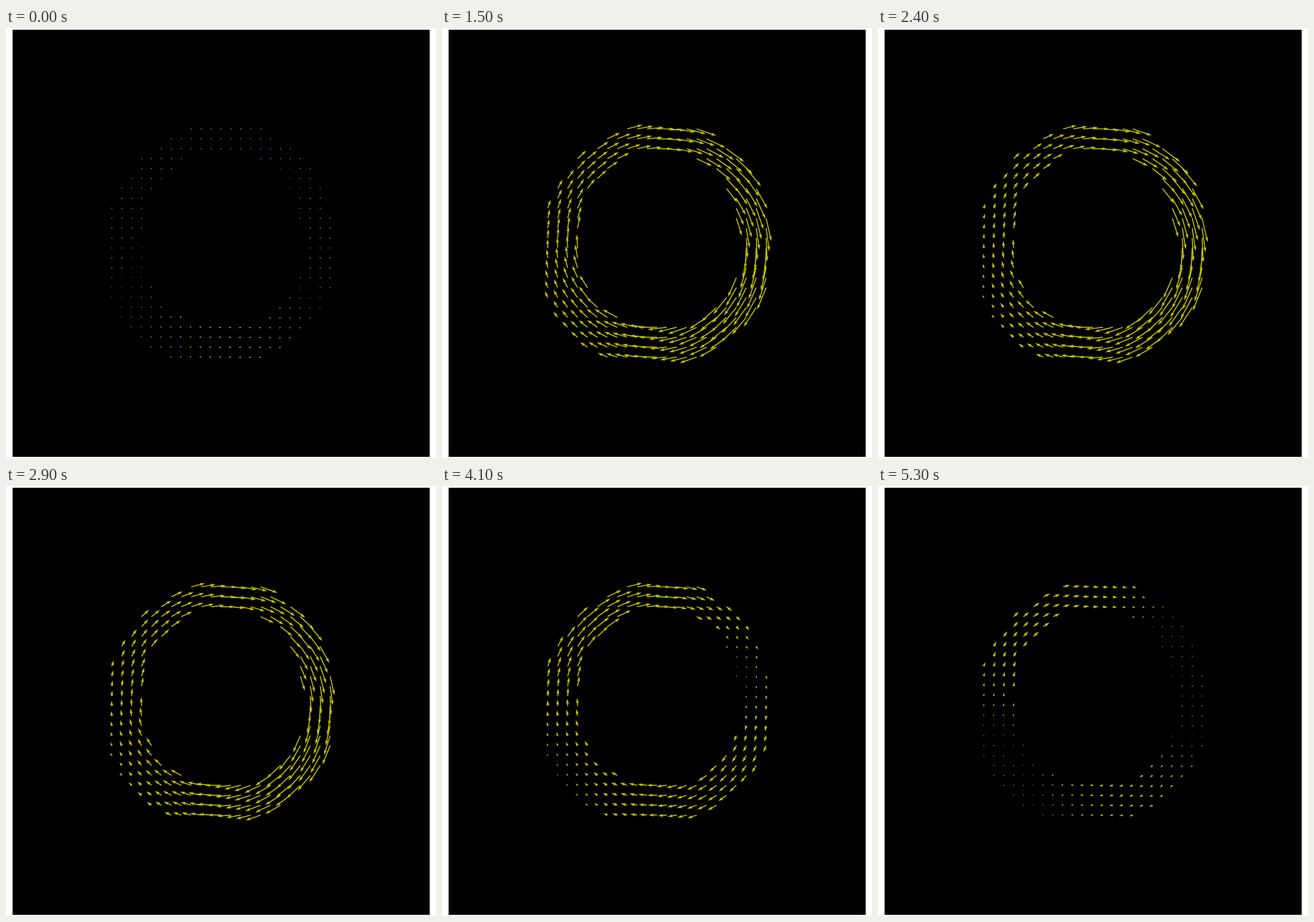
An HTML page that plays this animation: 748x748 px, repeating every 5400 ms.

```html
<!DOCTYPE html>
<html>
<head>
<meta charset="utf-8">
<style>
html, body { margin: 0; width: 100%; height: 100%; overflow: hidden; background: #fff; }
svg { display: block; width: 748px; height: 748px; }
</style>
</head>
<body>
<svg viewBox="0 0 748 748">
  <rect x="11.5" y="3" width="725.5" height="743"/>
  <path id="arrows" fill="#bfbf00"/>
</svg>
<script>
const LOOP = 5400, STEP = 100;
const CENTER = 374, CELL = 17.26, LEFT = 184.1, TOP = 175.5;
const W = 1.74; // shaft width
const R_IN = 150, R_OUT = 205;
const RAD = Math.PI / 180;

// Occupied column ranges of each grid row
const ROWS = ("8-15 6-16 5-18 3-7,15-19 3-6,17-20 2-5,18-20 1-4,18-21 1-3,19-21 " +
  "0-3,19-21 0-3,19-22 0-3,20-22 0-2,20-22 0-3,20-22 0-3,20-22 0-3,20-22 0-3,19-22 " +
  "0-4,19-22 0-4,18-21 1-5,17-21 1-7,16-20 2-19 3-18 4-17 6-15").split(" ");

// Swells that pass over the ring: peak second, duration, direction, number of lobes
const WAVES = [
  { size: 9, at: 0.5, span: 0.45, angle: 205, lobes: 1 },
  { size: 3.4, at: 0.7, span: 0.6, angle: 332, lobes: 2 },
  { size: 16.5, at: 2.25, span: 1.14, angle: 94, lobes: 1 },
  { size: 8.5, at: 4.3, span: 1.3, angle: 334, lobes: 2 },
  { size: 5.5, at: 4.4, span: 1.3, angle: 310, lobes: 1 }
];

// Mean speed: quick rise, plateau, slow decay
const flow = s =>
  29 * (1 - Math.exp(-(((s + 0.11) / 0.54) ** 2))) * Math.exp(-((s / 4.5) ** 3.4));

function speed(c, s) {
  const mean = flow(s);
  // the outer edge is faster at the upper right, slower at the lower left
  const tilt = 0.36 * mean * Math.cos(c.angle - 52 * RAD) * (c.mix - 0.5);
  return WAVES.reduce((sum, w) => sum + w.size *
    Math.exp(-(((s - w.at) / w.span) ** 2)) *
    Math.cos(w.lobes * (c.angle - w.angle * RAD)), mean + tilt);
}

const cells = [];
ROWS.forEach((row, j) => row.split(",").forEach(range => {
  const [from, to] = range.split("-").map(Number);
  for (let i = from; i <= to; i++) {
    const x = LEFT + i * CELL, y = TOP + j * CELL;
    const dx = x - CENTER, dy = y - CENTER, r = Math.hypot(dx, dy);
    cells.push({
      x, y, ux: -dy / r, uy: dx / r,
      angle: Math.atan2(dx, -dy), // clockwise from the top
      mix: (r - R_IN) / (R_OUT - R_IN)
    });
  }
}));

const HEX = Array.from({ length: 6 }, (_, k) =>
  [Math.cos(k * Math.PI / 3) * W / 2, Math.sin(k * Math.PI / 3) * W / 2]);

// Arrow along the x axis; short ones shrink as a whole, the shortest become dots
function outline(len) {
  if (len < W) return HEX;
  const full = Math.max(len, 5 * W), k = len / full;
  const neck = full - 4.5 * W, barb = full - 5 * W;
  return [[0, -.5 * W], [neck, -.5 * W], [barb, -1.5 * W], [full, 0],
    [barb, 1.5 * W], [neck, .5 * W], [0, .5 * W]].map(([a, b]) => [a * k, b * k]);
}

function arrow(c, v) {
  const dir = v < 0 ? -1 : 1, ux = c.ux * dir, uy = c.uy * dir;
  const pts = outline(Math.abs(v)).map(([a, b]) =>
    (c.x + a * ux - b * uy).toFixed(2) + " " + (c.y + a * uy + b * ux).toFixed(2));
  return "M" + pts.join("L") + "Z";
}

const path = document.getElementById("arrows");

function draw(t) {
  path.setAttribute("d", cells.map(c => arrow(c, speed(c, t / 1000))).join(""));
}

const start = performance.now();
let shown = -1;
function tick() {
  const t = Math.floor((performance.now() - start) % LOOP / STEP) * STEP;
  if (t !== shown) draw(shown = t);
  requestAnimationFrame(tick);
}
tick();
</script>
</body>
</html>
```
